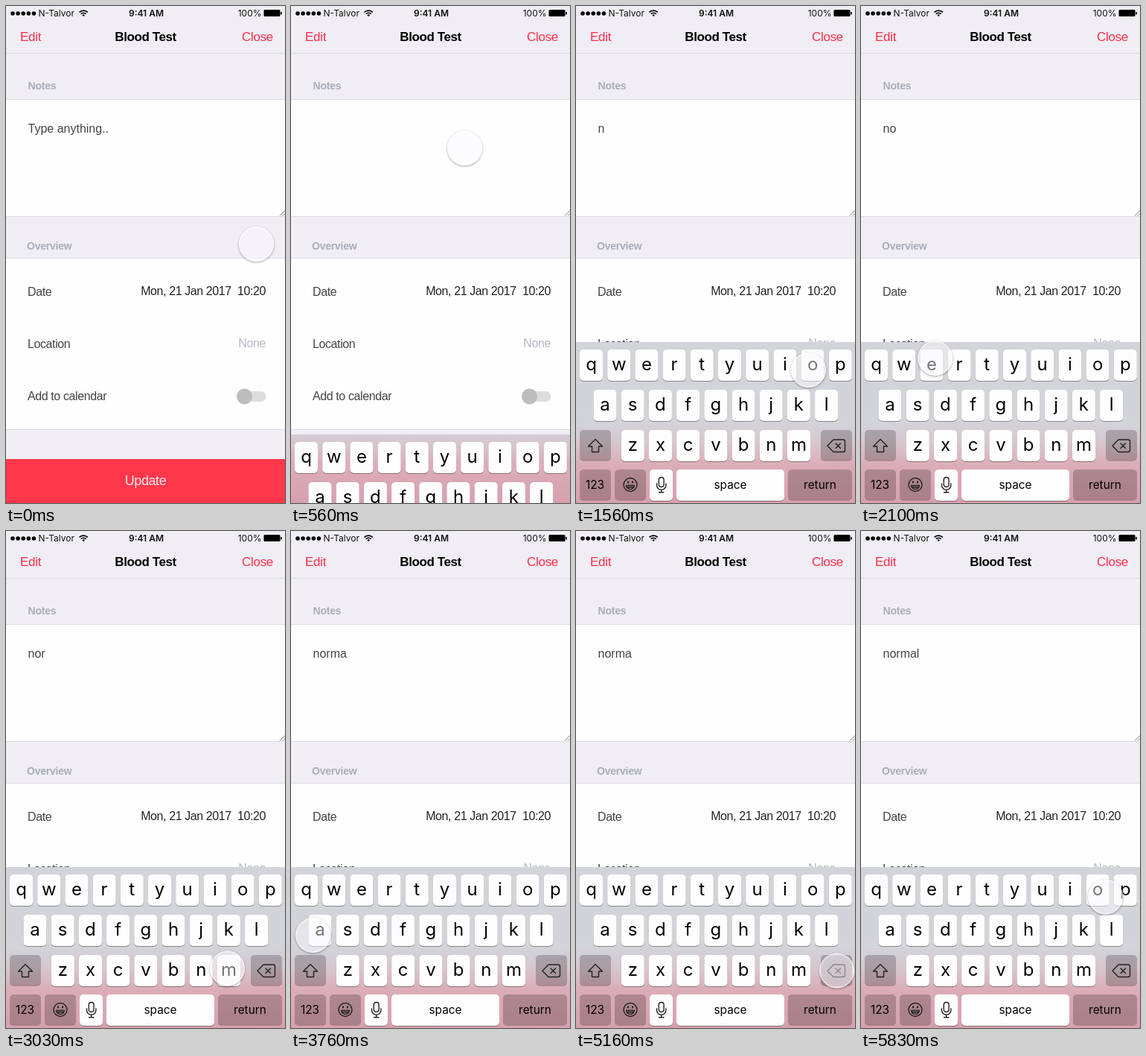
An HTML page that plays this animation: 375x667 px, repeating every 5.86 s.

```html
<!DOCTYPE html>
<html lang="en">
<head>
<meta charset="utf-8">
<title>Blood Test notes</title>
<style>
  html, body { margin: 0; width: 100%; height: 100%; overflow: hidden; background: #f0eef4; }
  svg { position: absolute; left: 0; top: 0; font: 16px "Liberation Sans", Arial, sans-serif; }
  .status, #keys { font-family: Inter, sans-serif; }
  .status { font-size: 12px; fill: #111; }
  .nav { font-size: 17px; letter-spacing: -.3px; fill: #ff2d4a; }
  .title { font-size: 17px; font-weight: bold; letter-spacing: -.4px; fill: #000; }
  .section { font-size: 14px; font-weight: bold; letter-spacing: -.23px; fill: #a9adb9; }
  .row { letter-spacing: -.4px; fill: #444; }
  .end { text-anchor: end; }
  .mid { text-anchor: middle; }
  .letter { font-size: 24px; }
  .label { font-size: 15.4px; }
  .icon { fill: none; stroke: #222; stroke-width: 1.4; stroke-linejoin: round; stroke-linecap: round; }
  #touch {
    position: absolute; left: -23.5px; top: -23.5px; width: 47px; height: 47px; border-radius: 50%;
    background: rgba(248, 247, 251, .48);
    box-shadow: 0 1px 3px rgba(0, 0, 0, .38), inset 0 0 2px 1px rgba(255, 255, 255, .8);
  }
</style>
</head>
<body>
<svg width="375" height="667" viewBox="0 0 375 667">
  <defs>
    <linearGradient id="frost" gradientUnits="userSpaceOnUse" x1="0" y1="451" x2="0" y2="667">
      <stop offset="0" stop-color="#d2d4da"/>
      <stop offset=".5" stop-color="#d3d3da"/>
      <stop offset=".63" stop-color="#d7c6ce"/>
      <stop offset=".76" stop-color="#dbadb8"/>
      <stop offset="1" stop-color="#d8a0ae"/>
    </linearGradient>
  </defs>
  <rect width="375" height="667" fill="#f0eef4"/>
  <path d="M0 126H375V282H0ZM0 339H375V568H0Z" fill="#fefefe"/>
  <path d="M0 63.5H375M0 125.5H375M0 282.5H375M0 338.5H375M0 568.5H375" stroke="#dfdde4"/>
  <path d="M368 281.5L375 274.5M372 281.5L375 278.5" stroke="#777"/>

  <g class="status">
    <path d="M9 10h0M16.1 10h0M23.2 10h0M30.3 10h0M37.4 10h0" stroke="#000" stroke-width="5.6" stroke-linecap="round"/>
    <text x="43.5" y="14">N-Talvor</text>
    <g fill="none" stroke="#000" stroke-width="1.7">
      <path d="M98.6 8.4a8 8 0 0 1 11.2 0M100.7 10.7a5 5 0 0 1 7 0"/>
      <path d="M102.3 12.2a2.7 2.7 0 0 1 3.8 0L104.2 14Z" fill="#000" stroke="none"/>
    </g>
    <text class="mid" x="188.5" y="14" font-weight="600">9:41 AM</text>
    <text class="end" x="343.5" y="14">100%</text>
    <rect x="346.5" y="5" width="22" height="9" rx="1.5" fill="#000"/>
    <path d="M370 8v3.5" stroke="#000" stroke-width="1.6"/>
  </g>

  <text class="nav" x="19" y="47">Edit</text>
  <text class="title mid" x="187.6" y="47">Blood Test</text>
  <text class="nav end" x="359" y="47">Close</text>
  <text class="section" x="29.5" y="112">Notes</text>
  <text id="note" x="29.5" y="170" fill="#444"></text>
  <text class="section" x="28" y="327">Overview</text>
  <g class="row">
    <text x="29" y="389">Date</text>
    <text x="29" y="459">Location</text>
    <text x="29" y="529">Add to calendar</text>
    <text class="end" x="349" y="388" fill="#222">Mon, 21 Jan 2017&#160; 10:20</text>
    <text class="end" x="349" y="458" fill="#b6b8c3">None</text>
  </g>
  <rect x="312" y="517" width="37.5" height="14" rx="7" fill="#dcdcdd"/>
  <circle cx="320.5" cy="524" r="10.5" fill="#bdbdbf"/>
  <rect y="608" width="375" height="59" fill="#ff374b"/>
  <text class="mid" x="187.5" y="643" font-size="18" letter-spacing="-.4" fill="#ffeaec">Update</text>

  <rect id="panel" width="375" height="216" fill="url(#frost)"/>
  <g id="keys"></g>
</svg>
<div id="touch"></div>

<script>
const $ = id => document.getElementById(id);
const LOOP = 5860, STEP = 200 / 3, TAP = 430;

// Keyboard
const face = (x, y, w, fill, alpha = 1) =>
  `<rect x="${x}" y="${y}" width="${w}" height="42" rx="5" fill="${fill}" fill-opacity="${alpha}"/>`;
const lightKey = (x, y, w) => face(x, y + 1, w, '#000', .36) + face(x, y, w, '#fdfdfd');
const darkKey = (x, y, w) => face(x, y, w, '#000', .21);
const label = (text, x, y, cls) => `<text class="mid ${cls}" x="${x}" y="${y}">${text}</text>`;

const rows = [['qwertyuiop', 20.5, 461], ['asdfghjkl', 39, 515], ['zxcvbnm', 76.3, 569]];
let board = '';
for (const [letters, x0, y] of rows)
  [...letters].forEach((c, i) => {
    const x = x0 + 37.2 * i;
    board += lightKey(x - 15.5, y, 31) + label(c, x, y + 27.5, 'letter');
  });
board += darkKey(5, 569, 42) + darkKey(329, 569, 42) + darkKey(5, 622, 42) + darkKey(52, 622, 42) +
  lightKey(99, 622, 31) + lightKey(135, 622, 145) + darkKey(285, 622, 86) +
  label('123', 25.5, 648, 'label') + label('space', 207.5, 648, 'label') + label('return', 328, 648, 'label') +
  `<g class="icon">
    <path d="M26 581.5L35.5 591H30.5V598.5H21.5V591H16.5Z"/>
    <path d="M346 582H359a2.5 2.5 0 0 1 2.5 2.5V596a2.5 2.5 0 0 1-2.5 2.5H346L338 590.3ZM349 587l6.5 6.5M355.5 587l-6.5 6.5"/>
    <circle cx="73" cy="642.5" r="9"/>
    <path d="M67.5 643.5H78.5C77.5 650 68.5 650 67.5 643.5ZM68.5 645.8H77.5"/>
    <path d="M70 638.5v1M76 638.5v1" stroke-width="2.2"/>
    <rect x="111.3" y="632.5" width="6.8" height="13" rx="3.4"/>
    <path d="M108.5 641v2a6.2 6.2 0 0 0 12.4 0v-2M114.7 649.5v3M111.5 652.7h6.4"/>
  </g>`;
$('keys').innerHTML = board;

// Time, x, y of the finger
const path = [
  [0, 336, 319], [TAP, 230, 150], [520, 230, 150], [760, 266, 616], [1100, 265, 597],
  [1300, 265, 597], [1560, 312, 488], [1760, 312, 478], [1890, 311, 478], [2100, 99, 472],
  [2270, 129, 476], [2560, 131, 478], [2960, 297, 585], [3100, 297, 588], [3230, 296, 589],
  [3560, 25, 541], [3740, 26, 542], [4120, 311, 543], [4400, 300, 538], [4470, 300, 538],
  [4700, 350, 579], [4800, 350, 579], [4960, 349, 589], [5090, 349, 589], [5220, 351, 590],
  [5500, 336, 547], [5640, 335, 547], [5850, 328, 489]
];
const notes = [
  [0, 'Type anything..'], [TAP, ''], [1360, 'n'], [1890, 'no'], [2560, 'nor'], [3090, 'norm'],
  [3690, 'norma'], [4290, 'normak'], [5090, 'norma'], [5690, 'normal']
];

const clamp = v => Math.min(1, Math.max(0, v));
const smooth = p => p * p * (3 - 2 * p);

function fingerAt(t) {
  const i = Math.max(1, path.findIndex(p => p[0] >= t));
  const [t0, x0, y0] = path[i - 1], [t1, x1, y1] = path[i];
  const p = smooth(clamp((t - t0) / (t1 - t0)));
  return [x0 + (x1 - x0) * p, y0 + (y1 - y0) * p];
}

function draw() {
  // Motion advances at 15 steps per second
  const tick = Math.floor((performance.now() % LOOP - 26) / STEP);
  const t = Math.max(0, 30 + tick * STEP);
  const [x, y] = fingerAt(t);
  const drop = Math.round(216 * (1 - clamp((t - 480) / 495)) ** 3);
  $('touch').style.transform = `translate(${x}px, ${y}px)`;
  $('note').textContent = notes.findLast(n => n[0] <= t)[1];
  $('panel').setAttribute('y', 451 + drop);
  $('keys').setAttribute('transform', `translate(0 ${drop})`);
  requestAnimationFrame(draw);
}
draw();
</script>
</body>
</html>
```
